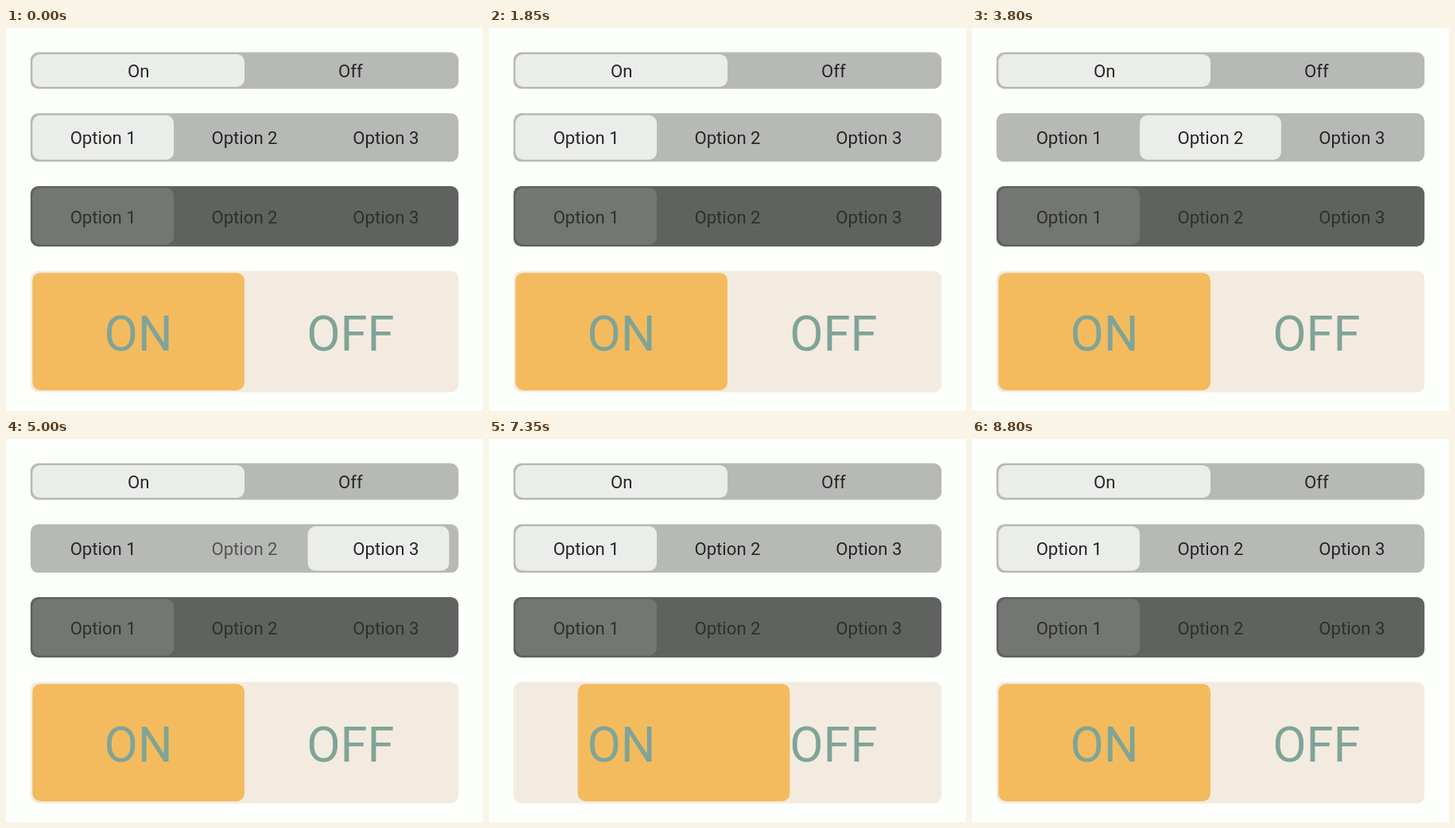
Write an HTML page with a canvas that moves like this. It is 600x482 px and loops after 9300 ms.

```html
<!DOCTYPE html>
<html lang="en">
<head>
<meta charset="utf-8">
<title>Segmented controls</title>
<style>
  html, body { margin: 0; width: 100%; height: 100%; overflow: hidden; background: #fdfffc; }
  canvas { display: block; }
</style>
</head>
<body>
<canvas id="stage" width="600" height="482"></canvas>
<script>
const ctx = document.getElementById('stage').getContext('2d');
const LOOP = 9300, TICK = 50;
const LEFT = 30.8, WIDTH = 538.4, PAD = 2.46, PRESSED = 0.68;

// moves: [start, duration, target segment, optional time of interruption]
// presses: [segment, down, up]
const controls = [
  {
    y: 30.5, h: 46, size: 22.15, labels: ['On', 'Off'],
    track: '#b7b9b6', thumb: '#ebedea', ink: '#252625',
    moves: [[185, 310, 1], [1535, 300, 0]],
    presses: [[1, 50, 300], [0, 1300, 1650]]
  },
  {
    y: 107.3, h: 61, size: 22.15, labels: ['Option 1', 'Option 2', 'Option 3'],
    track: '#b7b9b6', thumb: '#ebedea', ink: '#252625',
    moves: [[3185, 210, 1], [4135, 210, 2], [4971, 179, 1], [5935, 210, 0]],
    presses: [[1, 2900, 3300], [2, 3850, 4250], [1, 4800, 5100], [0, 5700, 6050]]
  },
  {
    y: 198.9, h: 76, size: 22.15, labels: ['Option 1', 'Option 2', 'Option 3'],
    track: '#5f625e', thumb: '#747673', ink: '#2e302d',
    moves: [], presses: []
  },
  {
    y: 305.7, h: 152.7, size: 61.5, labels: ['ON', 'OFF'],
    track: '#f4ebe0', thumb: '#f3bb5d', ink: '#7fa497',
    moves: [[7235, 300, 1], [7835, 290, 0], [8196, 200, 1, 8300], [8590, 210, 0]],
    presses: [[1, 7000, 7350], [0, 7650, 7950], [1, 8050, 8300], [0, 8300, 8700]]
  }
];

const easeInOut = p => p < 0.5 ? 2 * p * p : 1 - 2 * (1 - p) ** 2;

function thumbPosition(moves, t) {
  let pos = 0;
  for (const [start, duration, target, stop = Infinity] of moves) {
    if (t < start) break;
    const p = Math.min(1, (Math.min(t, stop) - start) / duration);
    pos += (target - pos) * easeInOut(p);
  }
  return pos;
}

function box(x, y, w, h, r, color) {
  ctx.fillStyle = color;
  ctx.beginPath();
  ctx.roundRect(x, y, w, h, r);
  ctx.fill();
}

function drawControl(c, t) {
  const segment = (WIDTH - 2 * PAD) / c.labels.length;
  const inner = LEFT + PAD;
  box(LEFT, c.y, WIDTH, c.h, 9.85, c.track);
  box(inner + thumbPosition(c.moves, t) * segment, c.y + PAD,
      segment, c.h - 2 * PAD, 9.85, c.thumb);

  ctx.font = `${c.size}px Roboto, sans-serif`;
  ctx.fillStyle = c.ink;
  c.labels.forEach((label, i) => {
    const down = c.presses.some(([s, from, to]) => s === i && t >= from && t < to);
    ctx.globalAlpha = down ? PRESSED : 1;
    ctx.fillText(label, inner + (i + 0.5) * segment, c.y + c.h / 2 + c.size * 0.3925);
  });
  ctx.globalAlpha = 1;
}

const began = performance.now();

function frame() {
  const elapsed = (performance.now() - began) % LOOP;
  const t = Math.floor(elapsed / TICK) * TICK;
  ctx.fillStyle = '#fdfffc';
  ctx.fillRect(0, 0, 600, 482);
  ctx.textAlign = 'center';
  controls.forEach(c => drawControl(c, t));
  requestAnimationFrame(frame);
}
frame();
</script>
</body>
</html>
```
